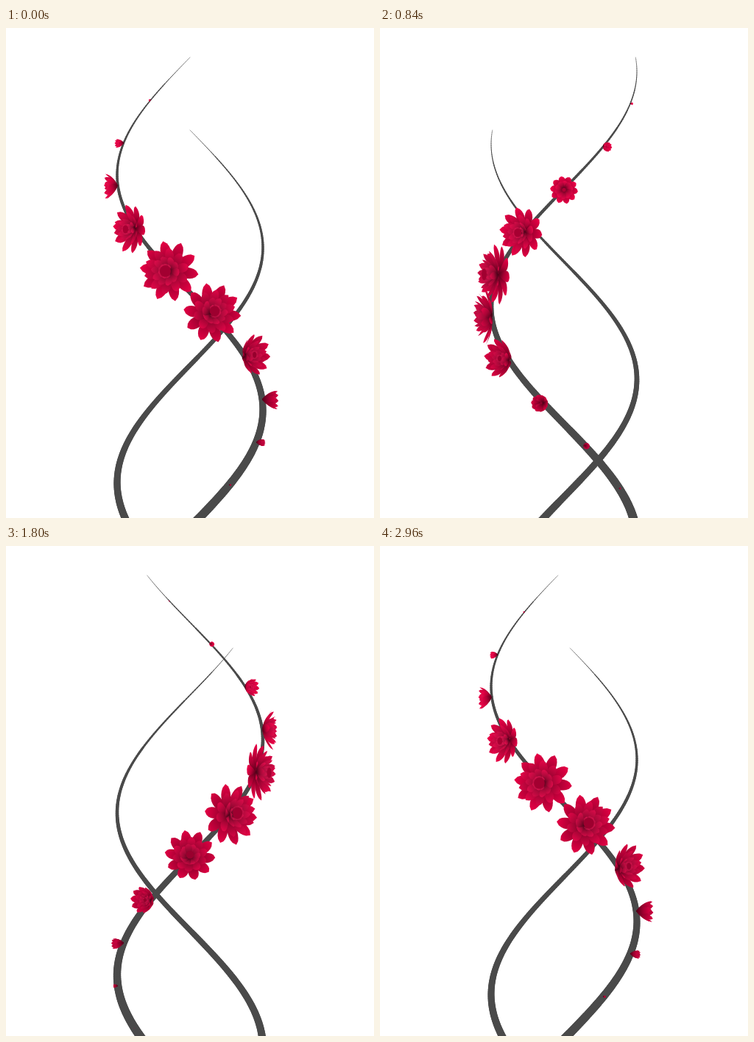
An HTML page with a canvas for the animation above (3000 ms loop, 500 px wide and 667 px high).

```html
<!DOCTYPE html>
<html lang="en">
<head>
<meta charset="utf-8">
<title>Flowering vines</title>
<style>
  html, body { margin: 0; width: 100%; height: 100%; overflow: hidden; background: #fff; }
  canvas { display: block; }
</style>
</head>
<body>
<canvas id="stage" width="500" height="667"></canvas>
<script>
const ctx = document.getElementById('stage').getContext('2d');
const { PI, sin, cos, abs, exp } = Math;
const LOOP = 3000, STEP = 40, TOP = 40, WAVE = 640, K = 2 * PI / WAVE, FLOWERS = 11;

// From the outside in: petal count, length, share of the opening angle
const RINGS = [[10, 1, 1], [10, 0.84, 0.75], [10, 0.7, 0.5], [10, 0.57, 0.28]];
const bell = (y, mid, width) => exp(-(((y - mid) / width) ** 2));

function drawVine(top, side, angle) {
  const x = y => 250 + side * 99 * sin(angle - K * (y - top));
  ctx.strokeStyle = '#4a4a4a';
  ctx.lineCap = 'round';
  for (let y = top; y < 680; y += 3) {
    ctx.lineWidth = 0.5 + (y - top) * 0.0182;
    ctx.beginPath();
    ctx.moveTo(x(y), y);
    ctx.lineTo(x(y + 3), y + 3);
    ctx.stroke();
  }
}

function drawFlower(y, phase) {
  const x = 250 + 99 * sin(phase), ax = sin(phase), az = abs(cos(phase));
  const size = 43 * sin(PI * (y - TOP) / WAVE) ** 2;
  if (size < 0.4) return;
  const open = (18 + 70 * bell(y, 338, 131)) * PI / 180;
  const lean = (2 - 7 * bell(y, 410, 70)) / 24;
  const light = 48 - (y - 150) * 0.018;

  // r and w: radial and sideways offset at azimuth a; h: height on the flower's axis
  const project = (r, h, a, w = 0) => {
    const u = r * cos(a) - w * sin(a), v = r * sin(a) + w * cos(a);
    return [x + h * ax + u * az, y + v + h * lean, h * az - u * ax];
  };

  const parts = [];
  RINGS.forEach(([count, scale, share], ring) => {
    const length = size * scale, tilt = open * share;
    for (let i = 0; i < count; i++) {
      const a = (i * 360 / count + ring * 18 - 102) * PI / 180;
      const left = [], right = [], n = 10;
      let r = 0, h = 0, z = 0;
      const base = project(0, 0, a);
      for (let k = 0; k <= n; k++) {
        const s = k / n;
        const w = 0.18 * length * Math.max(0, sin(PI * s ** 1.4)) ** 0.6;
        left.push(project(r, h, a, -w));
        right.unshift(project(r, h, a, w));
        if (k === 6) z = project(r, h, a)[2];
        if (k < n) {
          const bend = tilt + 0.25 - 0.5 * (s + 0.5 / n);
          r += sin(bend) * length / n;
          h += cos(bend) * length / n;
        }
      }
      const tone = light + (i % 2 ? -1.5 : 1);
      parts.push({ z, ring, tone, outline: [...left, ...right], base, tip: project(r, h, a) });
    }
  });

  const tint = (ring, l) => `hsl(342 ${100 - ring * 5}% ${l}%)`;
  parts.sort((p, q) => p.z - q.z);
  for (const { ring, tone, outline, base, tip } of parts) {
    const fill = ctx.createLinearGradient(base[0], base[1], tip[0], tip[1]);
    fill.addColorStop(0, tint(ring, 15));
    fill.addColorStop(0.5, tint(ring, tone - 11));
    fill.addColorStop(1, tint(ring, tone));
    ctx.fillStyle = fill;
    ctx.beginPath();
    outline.forEach(p => ctx.lineTo(p[0], p[1]));
    ctx.fill();
  }

  // Dark heart inside the innermost cup
  if (az > 0.35) {
    const heart = size * 0.57 * sin(open * 0.28) * 0.78, depth = size * 0.48;
    ctx.fillStyle = tint(0, light - 13);
    ctx.beginPath();
    for (let a = 0; a < 2 * PI; a += PI / 12) {
      const p = project(heart, depth, a);
      ctx.lineTo(p[0], p[1]);
    }
    ctx.fill();
  }
}

function frame(now) {
  const t = Math.floor(now % LOOP / STEP) * STEP / LOOP;
  ctx.clearRect(0, 0, 500, 667);
  drawVine(139, -1, 2 * PI * t);
  drawVine(TOP, 1, 2 * PI * t);
  for (let j = -FLOWERS; j <= FLOWERS; j++) {
    const y = TOP + WAVE * (j / FLOWERS + t);
    if (y > TOP && y < TOP + WAVE) drawFlower(y, -2 * PI * j / FLOWERS);
  }
  requestAnimationFrame(frame);
}
requestAnimationFrame(frame);
</script>
</body>
</html>
```
